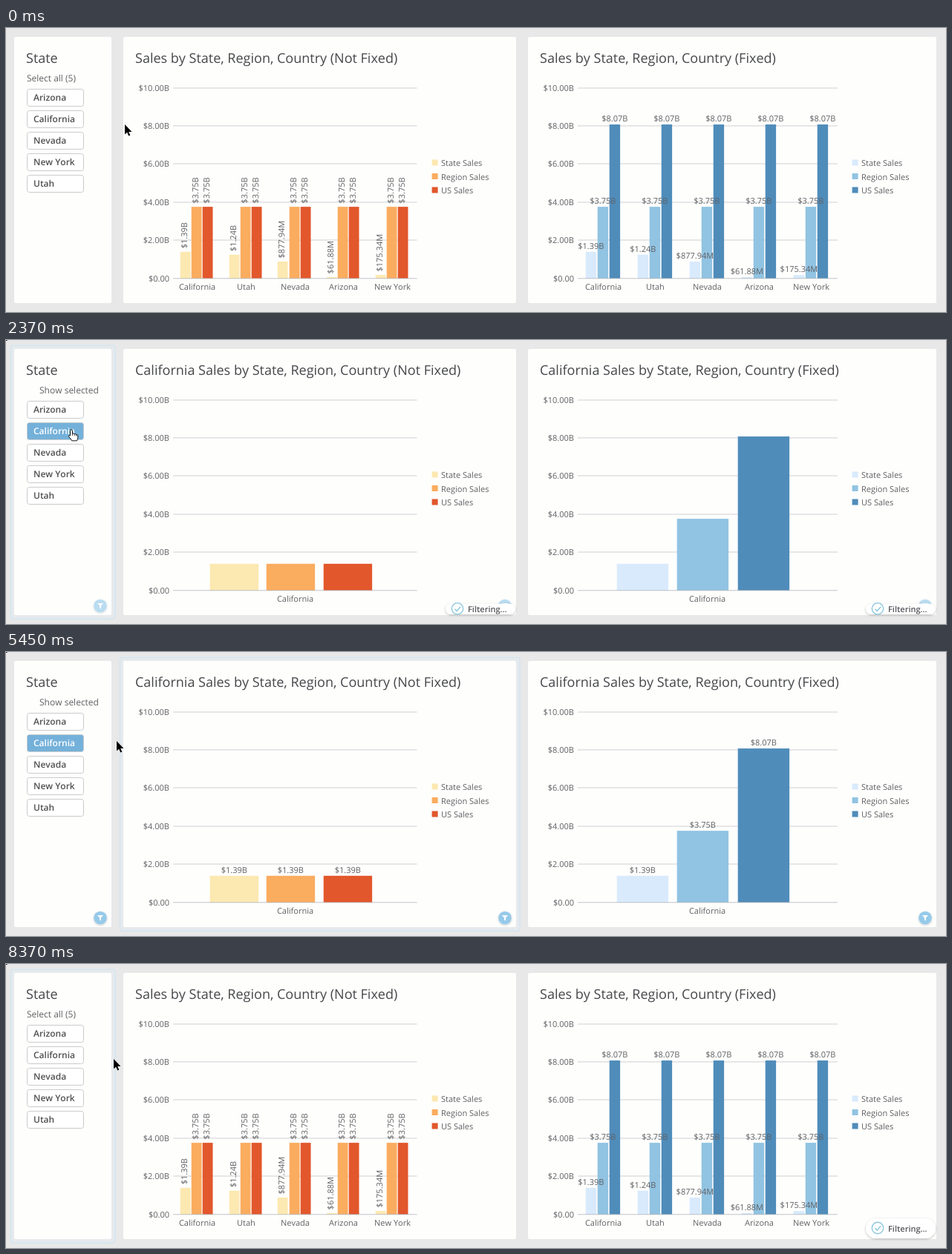
An HTML page that plays this animation: 1266 px wide and 383 px high, repeating every 8410 ms.

```html
<!DOCTYPE html>
<html lang="en">
<head>
<meta charset="utf-8">
<title>Sales dashboard</title>
<style>
  html, body { margin: 0; width: 100%; height: 100%; overflow: hidden; background: #e8e8e9; }
  svg { display: block; width: 1266px; height: 383px; }
  text { font: 11px "Open Sans", "Noto Sans", sans-serif; fill: #606063; text-rendering: geometricPrecision; font-kerning: none; }
  .title { font-size: 18px; fill: #46474a; }
  .note { font-size: 12px; }
  .pill { font-size: 12px; font-weight: 600; fill: #505053; }
  .toast text { font-weight: 600; fill: #55565a; }
</style>
</head>
<body>
<svg id="stage" viewBox="0 0 1266 383">
  <defs>
    <filter id="shadow" x="-20%" y="-40%" width="140%" height="200%">
      <feDropShadow dx="0" dy="1" stdDeviation="1.8" flood-color="#000" flood-opacity=".28"/>
    </filter>
  </defs>
</svg>
<script>
const LOOP = 8410;
const BASE = 337.5, UNIT = 25.7;
const CLICK_ON = 1830, FILTERED = 2000, CLICK_OFF = 6080, RESTORED = 6250;
const TOAST_HEIGHT = 27, TOAST_FLOOR = 370;
const stage = document.getElementById('stage');

function add(parent, tag, attrs = {}, content) {
  const el = document.createElementNS('http://www.w3.org/2000/svg', tag);
  for (const key in attrs) el.setAttribute(key, attrs[key]);
  if (content !== undefined) el.textContent = content;
  parent.appendChild(el);
  return el;
}
const group = (parent, attrs) => add(parent, 'g', attrs);
const rect = (parent, x, y, width, height, fill, more) =>
  add(parent, 'rect', { x, y, width, height, fill, ...more });
const label = (parent, x, y, content, more) => add(parent, 'text', { x, y, ...more }, content);
const middle = { 'text-anchor': 'middle' };

const states = ['California', 'Utah', 'Nevada', 'Arizona', 'New York'];
const stateSales = [1.39, 1.24, 0.87794, 0.06188, 0.17534];
const series = ['State Sales', 'Region Sales', 'US Sales'];
const money = v => v >= 1 ? `$${v.toFixed(2)}B` : `$${(v * 1000).toFixed(2)}M`;

const charts = [
  {
    panel: [158, 529], plot: [225, 553.5], legend: 573.6, tag: 592, icon: 672,
    name: 'Sales by State, Region, Country (Not Fixed)',
    colors: ['#fce8b1', '#faac5f', '#e2572c'], upright: true,
    all: { x: 235, step: 65.7, pitch: 15.1, width: 13.8, rest: [3.75, 3.75] },
    one: { x: 275, step: 0, pitch: 76.4, width: 65.4, rest: [1.39, 1.39] }
  },
  {
    panel: [703, 550], plot: [770, 1120], legend: 1139.6, tag: 1158, icon: 1238,
    name: 'Sales by State, Region, Country (Fixed)',
    colors: ['#d9eafc', '#91c3e2', '#4f8cba'], upright: false,
    all: { x: 781, step: 70, pitch: 16.2, width: 14.4, rest: [3.75, 8.07] },
    one: { x: 823, step: 0, pitch: 81.4, width: 69.4, rest: [3.75, 8.07] }
  }
];

function buildBars(chart, set, count, upright) {
  const root = group(stage);
  const bars = group(root), tags = group(root);
  const [left, right] = chart.plot;
  for (let g = 0; g < count; g++) {
    [stateSales[g], ...set.rest].forEach((value, i) => {
      const x = Math.round(set.x + set.step * g + set.pitch * i) - 0.3;
      const top = BASE - value * UNIT, cx = x + set.width / 2;
      rect(bars, x, top, set.width, BASE - top, chart.colors[i]);
      if (upright) {
        label(tags, 0, 0, money(value), { transform: `translate(${cx + 2.6} ${top - 4.5}) rotate(-90)` });
      } else {
        label(tags, cx, top - 4, money(value), middle);
      }
    });
    const center = left + (right - left) * (g + 0.5) / count;
    label(root, Math.ceil(center) - 0.5, 353, states[g], middle);
  }
  return { root, bars, tags };
}

function buildToast(x) {
  const root = group(stage, { class: 'toast' });
  const box = rect(root, x, 0, 94, 0, '#fff', { filter: 'url(#shadow)' });
  const content = group(root);
  const mark = { fill: 'none', stroke: '#8cc7dc', 'stroke-width': 1.4 };
  add(content, 'circle', { cx: x + 16, cy: 356, r: 7.7, ...mark });
  add(content, 'path', { d: `M${x + 12.5} 356.3l2.7 2.8 5-5.8`, ...mark });
  label(content, x + 30, 360.5, 'Filtering...');
  return { root, box, content };
}

function buildIcon(parent, x) {
  add(parent, 'circle', { cx: x, cy: 358.5, r: 8.8, fill: '#84c1e6', filter: 'url(#shadow)' });
  add(parent, 'path', { d: `M${x - 4} 355h8l-3 3.6v4l-2-1.3v-2.7z`, fill: '#fff' });
}

// Panels
const ring = (x, w) => rect(stage, x, 7.5, w, 368.5, '#e6eaed', { rx: 3, stroke: '#d3e5f0', 'stroke-width': 1.5 });
const rings = [ring(6.5, 140.5), ring(153.5, 538.5)];
rect(stage, 11, 12, 131, 359, '#fefefd', { rx: 2.5 });

// State filter
label(stage, 27, 47, 'State', { class: 'title' });
const note = label(stage, 28, 72, '', { class: 'note' });
const pills = ['Arizona', 'California', 'Nevada', 'New York', 'Utah'].map((name, i) => {
  const y = 82.5 + 29 * i;
  const box = rect(stage, 28.5, y, 76, 23, '#fff', { rx: 3, stroke: '#cbcbcd' });
  return { box, text: label(stage, 37, y + 15.5, name, { class: 'pill' }) };
});

// Charts
for (const chart of charts) {
  const [left, right] = chart.plot;
  rect(stage, chart.panel[0], 12, chart.panel[1], 359, '#fefefd', { rx: 2.5 });
  chart.title = label(stage, chart.panel[0] + 16, 47, '', { class: 'title' });
  for (let v = 0; v <= 10; v += 2) {
    const y = Math.round(BASE - v * UNIT);
    if (v) rect(stage, left, y - 0.5, right - left, 1, '#d2d2d4');
    label(stage, left - 5, y + 4, `$${v.toFixed(2)}${v ? 'B' : ''}`, { 'text-anchor': 'end' });
  }
  series.forEach((name, i) => {
    const y = 177.5 + 18.5 * i;
    rect(stage, chart.legend, y, 8, 8, chart.colors[i]);
    label(stage, chart.legend + 12.4, y + 8.7, name);
  });
  chart.full = buildBars(chart, chart.all, 5, chart.upright);
  chart.single = buildBars(chart, chart.one, 1, false);
  rect(stage, left, BASE - 0.4, right - left, 1.2, '#5a646e', { opacity: 0.32 });
}

const icons = group(stage);
[127, ...charts.map(c => c.icon)].forEach(x => buildIcon(icons, x));
for (const chart of charts) chart.toast = buildToast(chart.tag);

// Pointer
const dot = rect(stage, 0, 0, 1.5, 1, '#000');
const arrow = group(stage);
add(arrow, 'path', {
  d: 'M0 0V13.6L3.1 10.7 5.2 15.6 7.3 14.7 5.3 9.9H9.5Z',
  fill: '#000', stroke: '#fff', 'stroke-width': 1, 'paint-order': 'stroke'
});
const hand = group(stage);
const handShape = group(hand, { transform: 'scale(.9)' });
add(handShape, 'path', {
  d: 'M-1.6 9V1.6A1.6 1.6 0 0 1 1.6 1.6V6Q4 4.6 4.6 6.6 7 5.6 7.4 7.6 9.6 7 9.8 9.2V11.5Q9.6 14 8.4 16.5H.8Q-.6 13.8-3.6 10.6-4.4 8.4-2.6 8.4Z',
  fill: '#fff', stroke: '#111', 'stroke-width': 1.1, 'stroke-linejoin': 'round'
});
add(handShape, 'path', { d: 'M1.6 6V9M4.6 6.8V9.4M7.4 7.8V9.8', stroke: '#111', 'stroke-width': 0.8 });

// time, x, y
const path = [
  [0, 160, 130], [90, 158, 130], [830, 80, 122], [1250, 71, 121], [1650, 88, 121],
  [3050, 88, 121], [3600, 155, 120], [3910, 155, 120], [5450, 149, 120], [5900, 88, 121],
  [6480, 90, 121], [6830, 128, 120], [7500, 136, 122], [8370, 145, 128], [8410, 150, 129]
];
// start and end of the rise, then start of the fall
const toastTimes = [
  [[2320, 2570, 3660], [6675, 6925, 7980]],
  [[2320, 2570, 3800], [6675, 6925, 8400]]
];

const ramp = (t, from, to) => Math.min(1, Math.max(0, (t - from) / (to - from)));
const easeOut = k => 1 - (1 - k) ** 3;
const smooth = k => k * k * (3 - 2 * k);
const between = (t, from, to) => t >= from && t < to;
const show = (el, on) => el.setAttribute('visibility', on ? 'visible' : 'hidden');

function pointerAt(t) {
  let i = 1;
  while (i < path.length - 1 && path[i][0] < t) i++;
  const [t0, x0, y0] = path[i - 1], [t1, x1, y1] = path[i];
  const k = smooth(ramp(t, t0, t1));
  return [x0 + (x1 - x0) * k, y0 + (y1 - y0) * k];
}

function setBars(set, on, grow, fade) {
  show(set.root, on);
  set.bars.setAttribute('transform', `translate(0 ${BASE * (1 - grow)}) scale(1 ${grow})`);
  set.tags.setAttribute('opacity', fade);
}

// The pill unfolds upward from its lower edge; its content stays centred.
function setToast({ root, box, content }, times, t) {
  const run = times.find(([start, , fall]) => between(t, start, fall + 300));
  show(root, !!run);
  if (!run) return;
  const rise = ramp(t, run[0], run[1]), fall = ramp(t, run[2], run[2] + 300);
  const drop = 8 * (1 - rise + fall), height = TOAST_HEIGHT - 2 * drop;
  box.setAttribute('y', TOAST_FLOOR - height);
  box.setAttribute('height', height);
  box.setAttribute('rx', height / 2);
  content.setAttribute('transform', `translate(0 ${drop})`);
  root.setAttribute('opacity', Math.min(1, rise * 5) * (1 - fall));
}

function render(t) {
  const picked = between(t, CLICK_ON, CLICK_OFF);
  const filtered = between(t, FILTERED, RESTORED);
  const waiting = between(t, CLICK_ON, FILTERED) || between(t, CLICK_OFF, RESTORED);
  const noteOn = between(t, CLICK_ON, RESTORED);

  note.textContent = noteOn ? 'Show selected' : 'Select all (5)';
  note.setAttribute('x', noteOn ? 45 : 28);
  const { box, text } = pills[1];
  box.setAttribute('fill', picked ? '#74b1da' : '#fff');
  text.style.fill = picked ? '#fff' : '';

  charts.forEach((chart, i) => {
    chart.title.textContent = waiting ? '' : (filtered ? 'California ' : '') + chart.name;
    const back = t >= RESTORED;
    setBars(chart.full, !filtered,
      back ? easeOut(ramp(t, RESTORED, RESTORED + 350)) : 1,
      back ? ramp(t, 7120, 7350) : 1);
    setBars(chart.single, filtered,
      easeOut(ramp(t, FILTERED, FILTERED + 330)), ramp(t, 2870, 3100));
    setToast(chart.toast, toastTimes[i], t);
  });

  show(icons, filtered);
  icons.setAttribute('opacity', ramp(t, 2000, 2650) - 0.15 * ramp(t, 4000, 4500));

  show(rings[0], between(t, 1500, 3450) || t >= 5600);
  show(rings[1], between(t, 3450, 5600));

  const [x, y] = pointerAt(t);
  const pointing = between(t, 1600, 3200) || between(t, 5800, 6560);
  show(arrow, !pointing);
  show(hand, pointing);
  (pointing ? hand : arrow).setAttribute('transform', `translate(${x} ${y})`);
  show(dot, t >= 40);
}

const begin = performance.now();
function tick() {
  render((performance.now() - begin) % LOOP);
  requestAnimationFrame(tick);
}
render(0);
requestAnimationFrame(tick);
</script>
</body>
</html>
```
